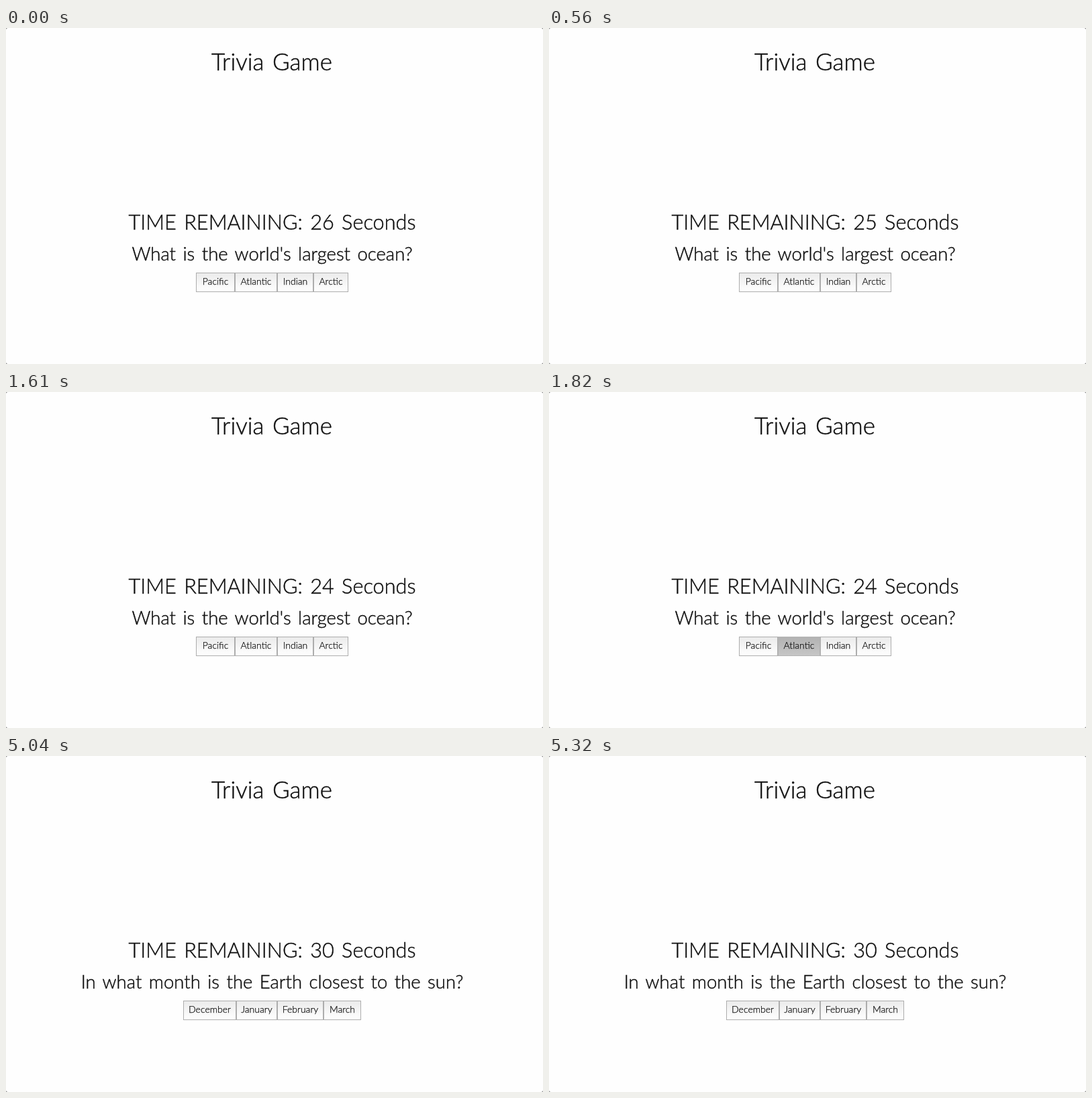
Recreate the animation shown at these times as an HTML page. Size 800 by 500 pixels, loop 5810 ms.

```html
<!DOCTYPE html>
<html lang="en">
<head>
<meta charset="utf-8">
<title>Trivia Game</title>
<style>
  html, body { margin: 0; width: 100%; height: 100%; overflow: hidden; background: #777; }
  svg { display: block; width: 800px; height: 500px; }
  text {
    font-family: Lato, "Open Sans", sans-serif; font-weight: 300; text-anchor: middle;
    word-spacing: 3px; fill: #111; stroke: #111; stroke-width: 0.45px;
  }
  .label { font-size: 14px; stroke-width: 0.25px; }
  .button { fill: url(#idle); stroke: #adadad; }
  .pressed { fill: url(#down); stroke: #b4b4b4; }
</style>
</head>
<body>
<svg viewBox="0 0 800 500">
  <defs>
    <linearGradient id="idle" x2="0" y2="1">
      <stop stop-color="#ebebeb"/><stop offset="1" stop-color="#fff"/>
    </linearGradient>
    <linearGradient id="down" x2="0" y2="1">
      <stop stop-color="#b2b2b2"/><stop offset="1" stop-color="#c6c6c6"/>
    </linearGradient>
  </defs>
  <rect width="800" height="500" rx="3" fill="#fefefe"/>
  <text x="396" y="63" font-size="35">Trivia Game</text>
  <g id="view"></g>
</svg>
<script>
const LOOP = 5810;
const view = document.getElementById("view");

const ocean = {
  text: "What is the world's largest ocean?",
  answers: ["Pacific", "Atlantic", "Indian", "Arctic"],
  edges: [283, 341, 404, 458, 510]
};
const month = {
  text: "In what month is the Earth closest to the sun?",
  answers: ["December", "January", "February", "March"],
  edges: [264, 343, 404, 473, 529]
};

const line = (text, y, size) =>
  `<text x="396.5" y="${y}" font-size="${size}">${text}</text>`;

function button(label, left, right, pressed) {
  return `<rect class="button ${pressed ? "pressed" : ""}" x="${left + 0.5}" y="364.5"
    width="${right - left - 1}" height="28"/>
    <text class="label" x="${(left + right) / 2}" y="382">${label}</text>`;
}

function question({ text, answers, edges }, seconds, pressed) {
  return line(`TIME REMAINING: ${seconds} Seconds`, 300, 30.7) + line(text, 346, 27.5) +
    answers.map((a, i) => button(a, edges[i], edges[i + 1], a === pressed)).join("");
}

const result = answer =>
  line("YOU GOT IT WRONG", 300, 30.7) + line("The correct answer was:" + answer, 342, 24.2);

// Start time in ms and content of each scene
const scenes = [
  [0, question(ocean, 26)],
  [560, question(ocean, 25)],
  [1610, question(ocean, 24)],
  [1820, question(ocean, 24, "Atlantic")],
  [1890, result("Pacific")],
  [5040, question(month, 30)]
];

let shown;
function draw() {
  const time = performance.now() % LOOP;
  const scene = scenes.findLast(([start]) => start <= time);
  if (scene !== shown) {
    shown = scene;
    view.innerHTML = scene[1];
  }
  requestAnimationFrame(draw);
}
draw();
</script>
</body>
</html>
```
